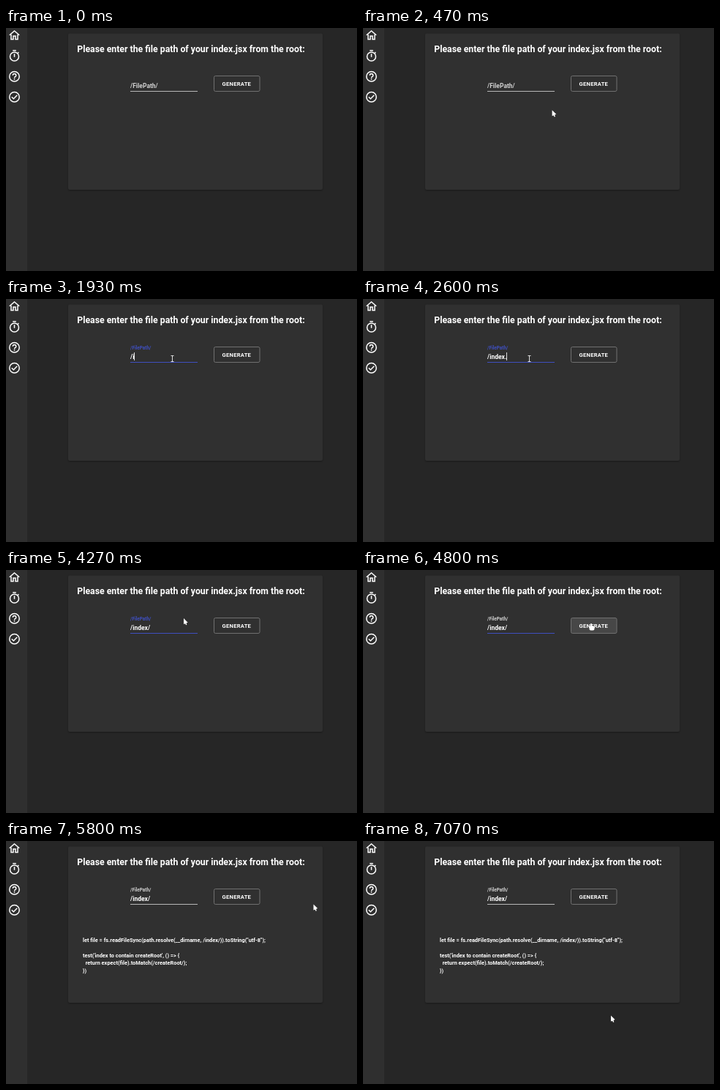
Animation, 480 px wide and 332 px high, one loop 7140 ms. Source, as an HTML page with a canvas:

```html
<!DOCTYPE html>
<html lang="en">
<head>
<meta charset="utf-8">
<title>File path form</title>
<style>
  html, body { margin: 0; width: 100%; height: 100%; overflow: hidden; background: #262626; }
  canvas { display: block; }
</style>
</head>
<body>
<canvas id="stage" width="480" height="332"></canvas>
<script>
const ctx = document.getElementById('stage').getContext('2d');
const LOOP = 7140;
const STEPS_PER_MS = 15 / 1000;
const BLUE = '#3f4fbe';
const FIELD = { x: 170, y: 70, w: 92, h: 18 };
const BUTTON = { x: 284.5, y: 65.5, w: 62.5, h: 21 };

// All times below are counted in steps of 1/15 s.
const ENTER = 2, FOCUS = 13, TYPING = 24, BLUR = 72, PRESS = 73, RESULT = 74;
const FADE = 5, BLINK = 8;

// One character per step: a space waits, "<" deletes.
const keys = '/    ind  e  x .            <   /';

const linear = k => k;
const easeIn = k => k * k;
const easeOut = k => 1 - (1 - k) ** 2;
const smooth = k => k * k * (3 - 2 * k);

const entry = { x: 449, y: 300 };
const moves = [
  { from: ENTER, to: 10, x: 227.5, y: 81.5, ease: easeOut },
  { from: 60, to: 69, x: 306, y: 73, ease: easeIn, lift: 14 },
  { from: 71, to: 72, x: 312, y: 73, ease: linear },
  { from: 76, to: 82, x: 425, y: 85.5, ease: smooth },
  { from: 84, to: 87, x: 420.5, y: 86.5, ease: linear },
  { from: 103, to: 106, x: 339, y: 238.5, ease: linear }
];

const code = [
  'let file = fs.readFileSync(path.resolve(__dirname, /index/)).toString("utf-8");',
  '',
  "test('index to contain createRoot', () => {",
  '  return expect(file).toMatch(/createRoot/);',
  '})'
];

const clamp = v => Math.max(0, Math.min(1, v));
const mix = (a, b, k) => a + (b - a) * k;
const inside = (p, r) => p && p.x >= r.x && p.x <= r.x + r.w && p.y >= r.y && p.y <= r.y + r.h;

function mouseAt(n) {
  if (n < ENTER) return null;
  let { x, y } = entry;
  for (const { from, to, x: toX, y: toY, ease, lift = 0 } of moves) {
    const time = clamp((n - from) / (to - from));
    x = mix(x, toX, ease(time));
    y = mix(y, toY, ease(time)) - lift * Math.sin(Math.PI * time);
  }
  return { x, y };
}

function typedAt(n) {
  let value = '', last = FOCUS;
  [...keys].slice(0, Math.max(0, n - TYPING + 1)).forEach((key, i) => {
    if (key === ' ') return;
    value = key === '<' ? value.slice(0, -1) : value + key;
    last = TYPING + i;
  });
  return { value, last };
}

function rect(x, y, w, h, fill) {
  ctx.fillStyle = fill;
  ctx.fillRect(x, y, w, h);
}

function roundBox({ x, y, w, h }, r = 2) {
  ctx.beginPath();
  ctx.roundRect(x, y, w, h, r);
}

function text(str, x, y, size, fill = '#fff', spacing = 0) {
  ctx.font = `bold ${size}px Roboto, sans-serif`;
  ctx.letterSpacing = spacing + 'px';
  ctx.fillStyle = fill;
  ctx.fillText(str, x, y);
  return ctx.measureText(str).width;
}

function line(...points) {
  ctx.beginPath();
  points.forEach(([x, y]) => ctx.lineTo(x, y));
  ctx.stroke();
}

function ring(x, y, r) {
  ctx.beginPath();
  ctx.arc(x, y, r, 0, Math.PI * 2);
  ctx.stroke();
}

const icons = [
  function home() {
    line([3, 11.4], [12, 3.8], [21, 11.4]);
    line([6, 10], [6, 19], [10, 19], [10, 13], [14, 13], [14, 19], [18, 19], [18, 10]);
  },
  function timer() {
    ring(12, 13, 8);
    line([9, 2], [15, 2]);
    line([12, 8], [12, 14]);
    line([18, 7], [19.8, 5.2]);
  },
  function help() {
    ring(12, 12, 9);
    ctx.beginPath();
    ctx.arc(12, 10, 3, Math.PI, Math.PI * 2.2);
    ctx.quadraticCurveTo(12, 12.5, 12, 15);
    ctx.stroke();
    rect(11, 16, 2, 2, '#fff');
  },
  function check() {
    ring(12, 12, 9);
    line([7, 12], [10.5, 15.3], [17, 8.7]);
  }
];

function drawSidebar() {
  rect(0, 0, 29, 332, '#2f2f2f');
  icons.forEach((icon, i) => {
    ctx.save();
    ctx.translate(2.5, 1.2 + i * 28);
    ctx.scale(0.75, 0.75);
    ctx.strokeStyle = '#fff';
    ctx.lineWidth = 2;
    icon();
    ctx.restore();
  });
}

function drawCard() {
  ctx.save();
  ctx.shadowColor = 'rgba(0,0,0,.35)';
  ctx.shadowBlur = 2;
  ctx.shadowOffsetY = 1;
  ctx.fillStyle = '#303030';
  roundBox({ x: 85, y: 7.5, w: 348, h: 213.5 });
  ctx.fill();
  ctx.restore();
  text('Please enter the file path of your index.jsx from the root:', 97.2, 33, 12.3);
}

function drawField(n, hovered) {
  const focused = n >= FOCUS && n < BLUR;
  const float = easeOut(clamp((n - FOCUS + 0.6) / 2));
  text('/FilePath/', FIELD.x, mix(81.5, 68.8, float), mix(8.5, 6.4, float), focused ? BLUE : '#d0d0d0');

  rect(FIELD.x, 86, FIELD.w, 1, hovered ? '#fff' : '#b8b8b8');
  const blue = FIELD.w * float * clamp(1 - (n - BLUR) / 2);
  rect(FIELD.x + (FIELD.w - blue) / 2, 86, blue, 1, BLUE);

  const { value, last } = typedAt(n);
  const width = text(value, FIELD.x, 81.5, 8.5);
  const lit = Math.floor((n - last) / BLINK) % 2 === 0;
  if (focused && lit) rect(Math.floor(FIELD.x + width), 73, 1, 11, '#ddd');
}

function drawButton(n, hovered) {
  ctx.save();
  roundBox(BUTTON);
  ctx.clip();
  if (hovered) rect(BUTTON.x, BUTTON.y, BUTTON.w, BUTTON.h, 'rgba(255,255,255,.11)');
  if (n >= PRESS) {
    ctx.fillStyle = `rgba(255,255,255,${0.14 * clamp((82 - n) / FADE)})`;
    ctx.beginPath();
    ctx.arc(309, 76, 12 * (n - PRESS), 0, Math.PI * 2);
    ctx.fill();
  }
  ctx.restore();
  ctx.strokeStyle = '#707070';
  ctx.lineWidth = 1;
  roundBox(BUTTON);
  ctx.stroke();
  text('GENERATE', 295.6, 79, 7.6, '#fff', 0.24);
}

function drawBeam() {
  ctx.strokeStyle = '#ddd';
  ctx.lineWidth = 1;
  line([0, -4], [0, 4]);
  for (const end of [-4, 4]) line([-2, end], [2, end]);
}

function drawArrow() {
  ctx.strokeStyle = ctx.fillStyle = '#fff';
  ctx.lineWidth = 1.5;
  ctx.beginPath();
  ctx.lineTo(0, 0);
  ctx.lineTo(0, 8);
  ctx.lineTo(5.6, 5.6);
  ctx.fill();
  line([2, 5], [3.7, 9]);
}

function drawHand() {
  ctx.fillStyle = '#fff';
  roundBox({ x: -1, y: 0, w: 2, h: 6 }, 1);
  ctx.fill();
  roundBox({ x: -2.5, y: 3.5, w: 7, h: 6 });
  ctx.fill();
}

function draw(n) {
  const mouse = mouseAt(n);
  const onField = inside(mouse, FIELD), onButton = inside(mouse, BUTTON);
  rect(0, 0, 480, 332, '#262626');
  drawSidebar();
  drawCard();
  drawField(n, onField);
  drawButton(n, onButton);
  if (n >= RESULT) code.forEach((row, i) => text(row, 105, 138.3 + i * 10.3, 7.4));
  if (!mouse) return;
  ctx.save();
  ctx.translate(mouse.x, mouse.y);
  (onField ? drawBeam : onButton ? drawHand : drawArrow)();
  ctx.restore();
}

const start = performance.now();
function tick(now) {
  const t = Math.max(0, now - start) % LOOP;
  draw(Math.floor((t + 4) * STEPS_PER_MS));
  requestAnimationFrame(tick);
}
draw(0);
requestAnimationFrame(tick);
</script>
</body>
</html>
```
